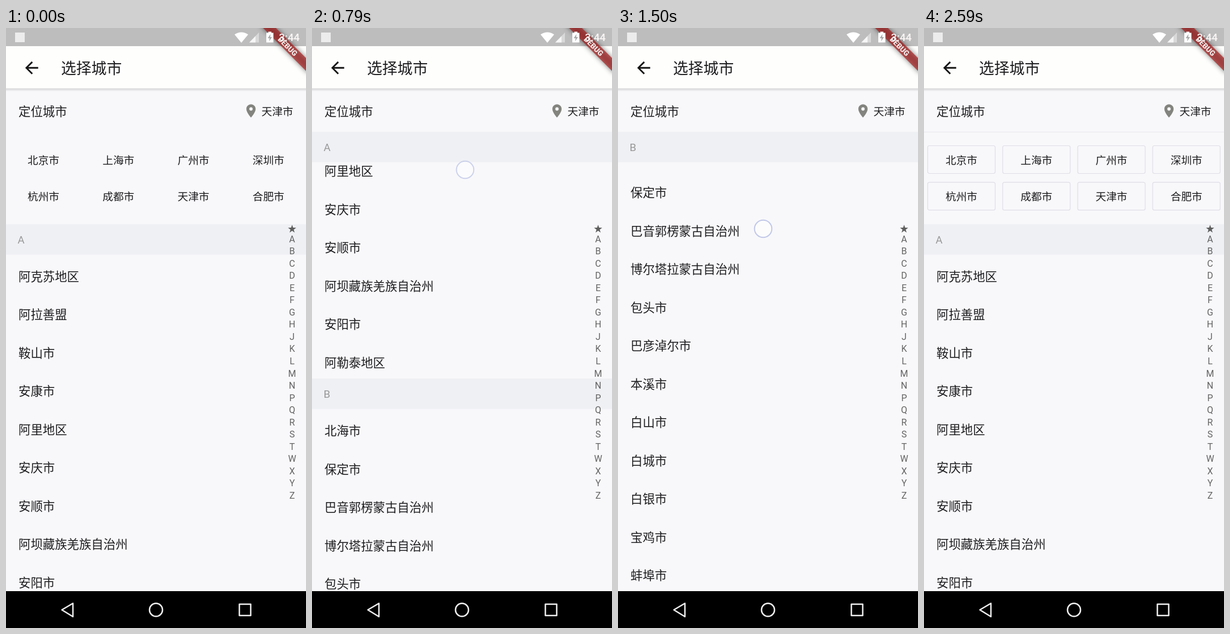
These frames come from a looping animation (529x1058 px, 2640 ms). An HTML page with a canvas:

```html
<!DOCTYPE html>
<html lang="zh-CN">
<head>
<meta charset="utf-8">
<title>选择城市</title>
<style>
html, body { margin: 0; width: 100%; height: 100%; overflow: hidden; background: #f8f8fb; }
canvas { display: block; width: 529px; height: 1058px; }
</style>
</head>
<body>
<canvas id="stage" width="529" height="1058"></canvas>
<script>
const ctx = document.getElementById('stage').getContext('2d');
const W = 529, LOOP = 2640;
const LIST_TOP = 183, LIST_END = 993, GRID_H = 163, HEAD_H = 53.5, ROW_H = 67.5;
const MAX_SCROLL = 943;
const BG = '#f8f8fb', INK = '#1d1d1f';
const CJK = '"Noto Sans CJK SC", "Noto Sans CJK", sans-serif';
const LATIN = 'Roboto, sans-serif';

const hotCities = ['北京市', '上海市', '广州市', '深圳市', '杭州市', '成都市', '天津市', '合肥市'];
const sections = [
  { tag: 'A', rows: ['阿克苏地区', '阿拉善盟', '鞍山市', '安康市', '阿里地区', '安庆市', '安顺市',
    '阿坝藏族羌族自治州', '安阳市', '阿勒泰地区'] },
  { tag: 'B', rows: ['北海市', '保定市', '巴音郭楞蒙古自治州', '博尔塔拉蒙古自治州', '包头市',
    '巴彦淖尔市', '本溪市', '白山市', '白城市', '白银市', '宝鸡市', '蚌埠市', '滨州市'] }
];
const letters = 'ABCDEFGHJKLMNPQRSTWXYZ';

const arrowPath = new Path2D('M20 11H7.83l5.59-5.59L12 4l-8 8 8 8 1.41-1.41L7.83 13H20z');
const pinPath = new Path2D('M12 2C8.13 2 5 5.13 5 9c0 5.25 7 13 7 13s7-7.75 7-13c0-3.87-3.13-7-7-7z' +
  'm0 9.5a2.5 2.5 0 0 1 0-5 2.5 2.5 0 0 1 0 5z');

const clamp = (v, a = 0, b = 1) => Math.min(b, Math.max(a, v));
const span = (t, a, b) => clamp((t - a) / (b - a));
const mix = (a, b, u) => a + (b - a) * u;
const decelerate = u => 1 - (1 - u) * (1 - u);
// friction curve of a flung list
const fling = u => (1.2 * u ** 3 - 3.27 * u ** 2 + 3.065 * u) / 0.995;

// first swipe goes up and flings, second goes down and hits the top
const UP = { down: 550, start: 605, end: 760, x0: 277, x1: 270, y0: 635, y1: 250 };
const BACK = { down: 1440, start: 1505, end: 1678, x0: 256, x1: 256, y0: 354, y1: 1043 };
const HIT = 1720, PEAK = 1850, GONE = 2450;

function scrollAt(t) {
  const drag = UP.y0 - UP.y1, pull = BACK.y1 - BACK.y0;
  if (t < UP.end) return drag * span(t, UP.start, UP.end);
  if (t < BACK.start) return mix(drag, MAX_SCROLL, fling(span(t, UP.end, 1478)));
  if (t < BACK.end) return MAX_SCROLL - pull * span(t, BACK.start, BACK.end) ** 1.5;
  return mix(MAX_SCROLL - pull, 0, span(t, BACK.end, HIT));
}

function box(x, y, w, h, color) {
  ctx.fillStyle = color;
  ctx.fillRect(x, y, w, h);
}

function text(str, x, cy, size, color = INK, align = 'left') {
  ctx.font = `${size}px ${CJK}`;
  ctx.textAlign = align;
  ctx.fillStyle = color;
  ctx.fillText(str, x, cy + size * 0.37);
}

function latin(str, x, cy, size, color, align = 'left', weight = 400) {
  ctx.font = `${weight} ${size}px ${LATIN}`;
  ctx.textAlign = align;
  ctx.fillStyle = color;
  ctx.fillText(str, x, cy + size * 0.355);
}

function icon(path, cx, cy, scale, color) {
  ctx.save();
  ctx.translate(cx, cy);
  ctx.scale(scale, scale);
  ctx.translate(-12, -12);
  ctx.fillStyle = color;
  ctx.fill(path, 'evenodd');
  ctx.restore();
}

function poly(points, color) {
  ctx.beginPath();
  points.forEach(([x, y]) => ctx.lineTo(x, y));
  ctx.closePath();
  ctx.fillStyle = color;
  ctx.fill();
}

function sectionHead(tag, y) {
  box(0, y, W, HEAD_H, '#eff0f4');
  latin(tag, 20.5, y + 27, 18.7, '#989898');
}

function grid(top, lineAlpha) {
  box(0, top, W, 1, `rgba(225,225,230,${0.7 * lineAlpha})`);
  hotCities.forEach((name, i) => {
    const x = 6.5 + (i % 4) * 132.25, y = top + 24.5 + Math.floor(i / 4) * 64.7;
    ctx.beginPath();
    ctx.roundRect(x, y, 119, 49, 3);
    ctx.strokeStyle = `rgba(222,222,230,${lineAlpha})`;
    ctx.lineWidth = 1.2;
    ctx.stroke();
    text(name, x + 59.5, y + 25.2, 18.7, INK, 'center');
  });
}

function list(t) {
  const scroll = scrollAt(t);
  ctx.save();
  ctx.beginPath();
  ctx.rect(0, LIST_TOP, W, LIST_END - LIST_TOP);
  ctx.clip();
  grid(LIST_TOP - scroll, span(t, 30, 300));

  let y = LIST_TOP + GRID_H - scroll, current = null, next = Infinity;
  for (const { tag, rows } of sections) {
    if (y <= LIST_TOP) current = tag;
    else next = Math.min(next, y);
    sectionHead(tag, y);
    y += 53;
    for (const name of rows) {
      if (y > 90 && y < LIST_END) text(name, 22, y + 39, 21.4);
      y += ROW_H;
    }
  }
  if (current) sectionHead(current, Math.min(LIST_TOP, next - HEAD_H));
  glow(t);
  ctx.restore();
}

function glow(t) {
  if (t < HIT || t > GONE) return;
  const grow = decelerate(span(t, HIT, PEAK));
  const left = 1 - decelerate(span(t, PEAK, GONE));
  const r = W * 1.5, h = W * 0.201;
  ctx.save();
  ctx.translate(0, LIST_TOP);
  ctx.scale(1, 1.1 * grow * left);
  ctx.beginPath();
  ctx.arc(W / 2, h - r, r, 0, Math.PI * 2);
  ctx.fillStyle = `rgba(33,150,243,${(0.3 + 0.05 * grow) * left})`;
  ctx.fill();
  ctx.restore();
}

function indexBar() {
  const star = [];
  for (let i = 0; i < 10; i++) {
    const r = i % 2 ? 3 : 7.6, a = -Math.PI / 2 + i * Math.PI / 5;
    star.push([504.5 + r * Math.cos(a), 354.5 + r * Math.sin(a)]);
  }
  poly(star, '#5e5e5e');
  [...letters].forEach((c, i) => latin(c, 504.5, 372 + i * 21.53, 16, '#636363', 'center'));
}

function topBars() {
  box(0, 106, W, 77, BG);
  const shade = ctx.createLinearGradient(0, 106, 0, 112);
  shade.addColorStop(0, 'rgba(0,0,0,0.16)');
  shade.addColorStop(1, 'rgba(0,0,0,0)');
  box(0, 106, W, 6, shade);
  box(0, 32, W, 74.5, '#fefefd');
  icon(arrowPath, 45.3, 70.3, 1.43, '#151515');
  text('选择城市', 97, 71.3, 26.8);
  text('定位城市', 22, 147.5, 21.4);
  icon(pinPath, 432, 146.3, 1.17, '#84847f');
  text('天津市', 506.5, 147.3, 18.7, INK, 'right');
  box(0, 0, W, 32, '#bdbdbd');
}

function banner() {
  ctx.save();
  ctx.translate(W, 0);
  ctx.rotate(Math.PI / 4);
  ctx.filter = 'blur(5px)';
  box(-60, 37.5, 120, 16, 'rgba(0,0,0,0.5)');
  ctx.filter = 'none';
  box(-60, 37.5, 120, 16, 'rgba(170,28,28,0.68)');
  latin('DEBUG', 0, 45.6, 13.2, '#f4eaea', 'center', 900);
  ctx.restore();
}

function statusIcons() {
  box(16, 8, 17, 17, '#ececec');
  ctx.beginPath();
  ctx.moveTo(415, 26);
  ctx.lineTo(403, 11.5);
  ctx.quadraticCurveTo(415, 3.5, 427, 11.5);
  ctx.closePath();
  ctx.fillStyle = '#fff';
  ctx.fill();
  poly([[429, 25.5], [446, 25.5], [446, 8]], '#d9d9d9');
  poly([[429, 25.5], [440, 25.5], [440, 14.2]], '#f6f6f6');
  box(459, 8.5, 12.5, 17, '#fff');
  box(462.5, 6.5, 5.5, 2.5, '#fff');
  poly([[466.5, 10.5], [461.5, 18], [464.8, 18], [464, 23.5], [469, 16], [465.8, 16]], '#a9a9a9');
  latin('3:44', 499.5, 16.5, 18.6, '#fbf6f6', 'center', 500);
}

function navBar() {
  box(0, LIST_END, W, 65, '#000');
  ctx.strokeStyle = '#efefef';
  ctx.lineWidth = 2.5;
  ctx.lineJoin = 'round';
  ctx.beginPath();
  ctx.moveTo(98.5, 1026);
  ctx.lineTo(118, 1014.5);
  ctx.lineTo(118, 1038);
  ctx.closePath();
  ctx.stroke();
  ctx.beginPath();
  ctx.arc(264.5, 1026, 11.5, 0, Math.PI * 2);
  ctx.stroke();
  ctx.strokeRect(411.5, 1016, 20, 20);
}

function touch(t, s, power) {
  const alpha = span(t, s.down, s.down + 35) * (1 - span(t, s.end, s.end + 150));
  if (!alpha) return;
  const u = span(t, s.start, s.end) ** power;
  ctx.save();
  ctx.globalAlpha = alpha;
  ctx.beginPath();
  ctx.arc(mix(s.x0, s.x1, u), mix(s.y0, s.y1, u), 15.3, 0, Math.PI * 2);
  ctx.fillStyle = 'rgba(255,255,255,0.6)';
  ctx.fill();
  ctx.strokeStyle = 'rgba(184,191,228,0.85)';
  ctx.lineWidth = 2;
  ctx.stroke();
  ctx.restore();
}

function draw(t) {
  box(0, 0, W, 1058, BG);
  topBars();
  list(t);
  indexBar();
  banner();
  statusIcons();
  navBar();
  touch(t, UP, 1);
  touch(t, BACK, 1.5);
}

const began = performance.now();
function tick() {
  draw((performance.now() - began) % LOOP);
  requestAnimationFrame(tick);
}
tick();
</script>
</body>
</html>
```
